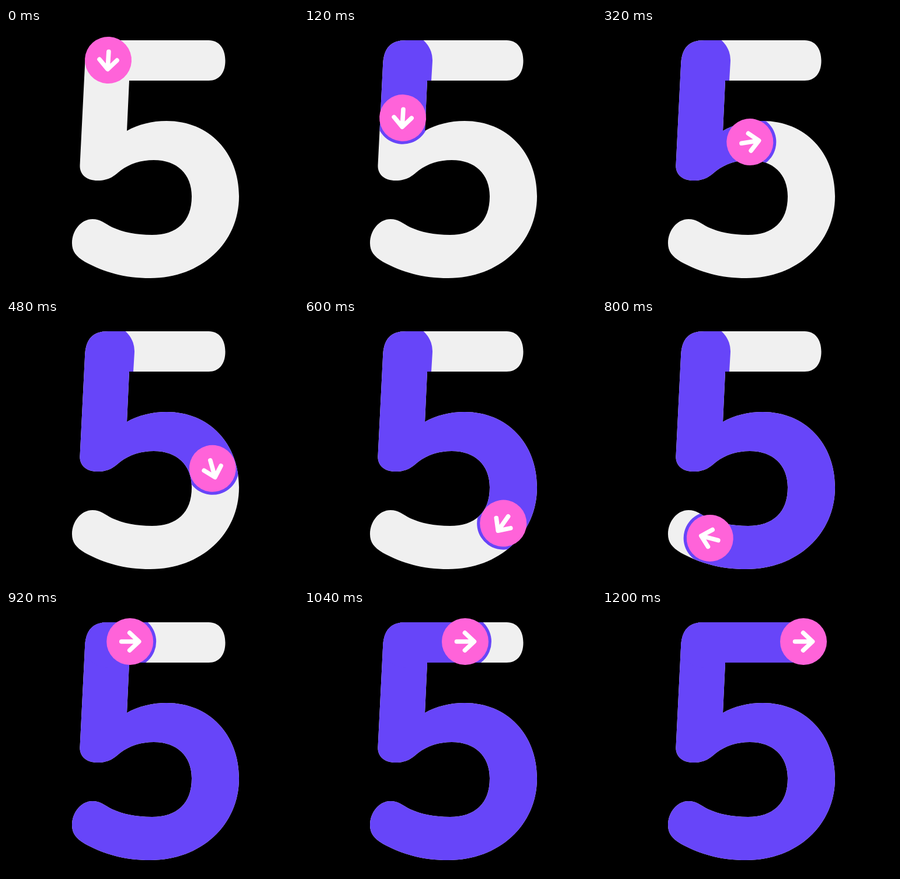
Write an HTML page that moves like this. It is 500x450 px and loops after 3000 ms.

```html
<!DOCTYPE html>
<html lang="en">
<head>
<meta charset="utf-8">
<title>Tracing the digit five</title>
<style>
  html, body { margin: 0; width: 100%; height: 100%; overflow: hidden; background: #000; }
  svg { display: block; width: 100%; height: 100%; }
  .line { fill: none; stroke-linecap: round; stroke-linejoin: round; }
  .trail { stroke: #6745f9; stroke-width: 90; }
  .arrow { stroke: #fff; stroke-width: 7.6; }
</style>
</head>
<body>
<svg viewBox="0 0 500 450">
  <defs>
    <path id="digit" d="M175 21H347C365 21 375.5 35 375.5 56C375.5 77 365 90 347 90H211L207 176
      C226 165 250 159 275 159C348 159 399 213 399 288C399 368 334 428 247 428
      C203 428 168 418 135 400C120 391 113 382 113 368C113 346 129 327 148 327
      C162 327 170 335 182 341C200 349 222 354 250 354C292 354 318 332 318 288
      C318 250 293 226 253 226C231 226 212 232 196 244C185 253 177 261 157 261
      C138 261 126 251 126.5 235L135 65C136 34 148 21 175 21Z"/>
    <clipPath id="inside"><use href="#digit"/></clipPath>
  </defs>
  <use href="#digit" fill="#f0f0f0"/>
  <g clip-path="url(#inside)">
    <path id="body" class="line trail" d="M175 55L165 223C196 205 228 199 253.5 195
      C322 184 358 232 358 288C358 352 322 387 248 387C226 387 205 380 185 375
      C172 371.5 160 366 148 360"/>
    <path id="bar" class="line trail" d="M175 54H345"/>
  </g>
  <g id="guide">
    <circle r="40" fill="#ff63d9"/>
    <path class="line arrow" d="M-14.5 0H15M-.5 -15L15.5 0L-.5 15"/>
  </g>
</svg>
<script>
const LOOP = 3000, STEP = 40;
const byId = id => document.getElementById(id);
const guide = byId('guide');

// Distance along a path of the spot closest to (x, y).
function distanceTo(path, x, y) {
  const total = path.getTotalLength();
  let best = 0, least = Infinity;
  for (let d = 0; d <= total; d += 0.5) {
    const p = path.getPointAtLength(d);
    const gap = Math.hypot(p.x - x, p.y - y);
    if (gap < least) { least = gap; best = d; }
  }
  return best;
}

// Each stroke passes through [time, x, y] at an even pace in between.
function makeStroke(id, stops) {
  const path = byId(id);
  const keys = stops.map(([t, x, y]) => [t, distanceTo(path, x, y)]);
  return { path, keys, total: path.getTotalLength() };
}

const body = makeStroke('body', [
  [0, 175, 55], [120, 169, 154], [320, 253.5, 195],
  [600, 340.5, 349], [800, 185, 375], [850, 148, 360]
]);
const bar = makeStroke('bar', [[850, 175, 54], [1170, 345, 54]]);

function distanceAt({ keys }, t) {
  if (t <= keys[0][0]) return 0;
  for (let i = 1; i < keys.length; i++) {
    const [t0, d0] = keys[i - 1], [t1, d1] = keys[i];
    if (t < t1) return d0 + (d1 - d0) * (t - t0) / (t1 - t0);
  }
  return keys[keys.length - 1][1];
}

function reveal(stroke, d) {
  stroke.path.style.visibility = d > 0 ? 'visible' : 'hidden';
  stroke.path.setAttribute('stroke-dasharray', `${d} 2000`);
}

function placeGuide({ path, total }, d) {
  const p = path.getPointAtLength(d);
  const a = path.getPointAtLength(Math.max(0, d - 1));
  const b = path.getPointAtLength(Math.min(total, d + 1));
  const angle = Math.atan2(b.y - a.y, b.x - a.x) * 180 / Math.PI;
  guide.setAttribute('transform', `translate(${p.x} ${p.y}) rotate(${angle})`);
}

function draw(time) {
  const t = Math.floor(time % LOOP / STEP) * STEP;
  for (const stroke of [body, bar]) reveal(stroke, distanceAt(stroke, t));
  const active = t < 850 ? body : bar;
  placeGuide(active, distanceAt(active, t));
}

const start = performance.now();
function tick() {
  draw(performance.now() - start);
  requestAnimationFrame(tick);
}
tick();
</script>
</body>
</html>
```
